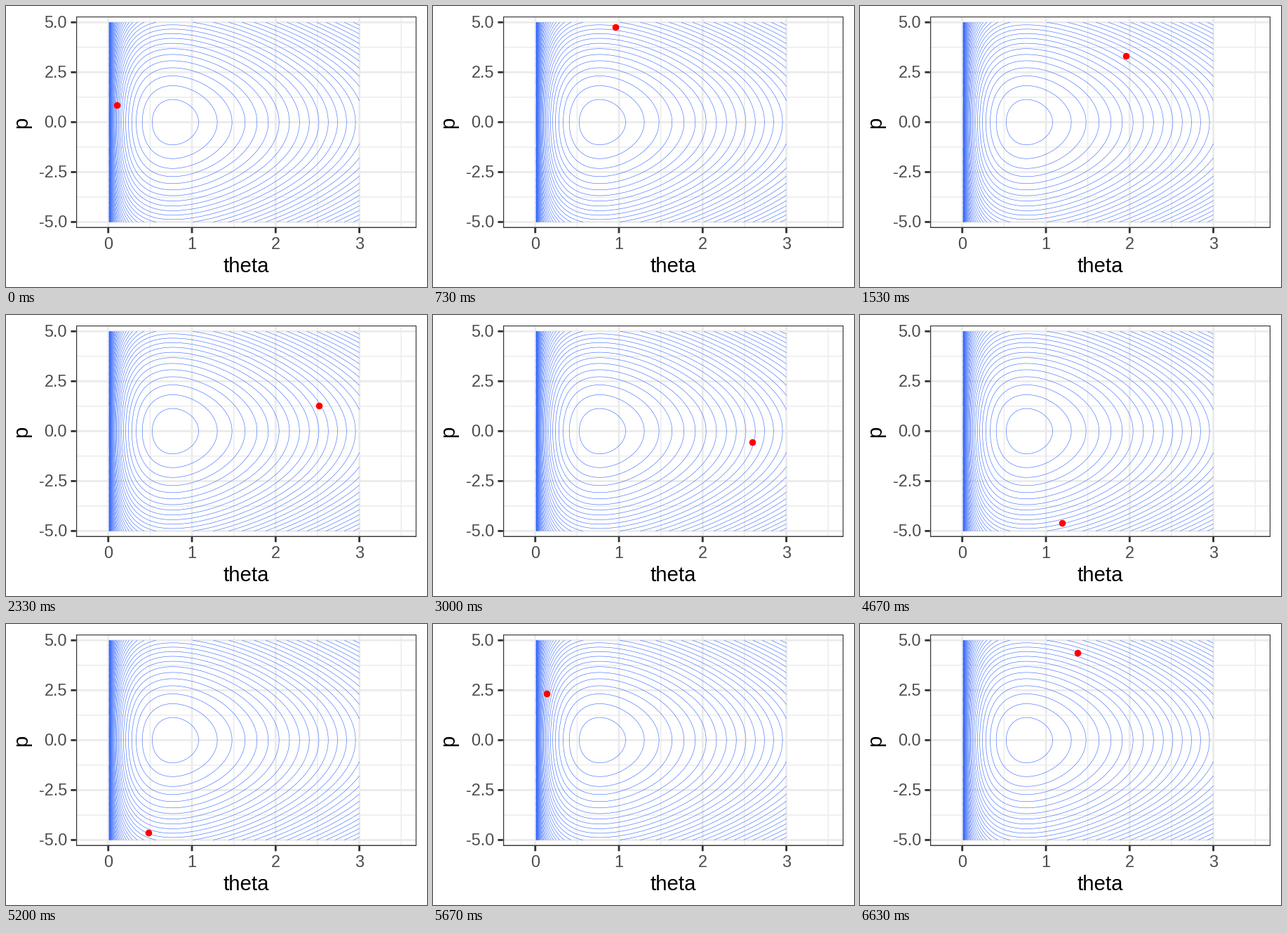
Animation, 600 px wide and 400 px high, one loop 6.67 s. Source, as a matplotlib script:

```python
import numpy as np
import matplotlib.pyplot as plt
from matplotlib.animation import FuncAnimation
from matplotlib.patches import Rectangle

W, H, DPI = 600, 400, 100
PX = 72 / DPI                  # one pixel in points
FRAMES, LOOP = 200, 6670
RATE, SHAPE, STEP = 13, 10, 0.01
LEFT, RIGHT, TOP, BOTTOM = 99.8, 585.3, 14.7, 316.0
X_LIM, P_LIM = (-0.385, 3.685), (-5.3, 5.3)
LINE = 2.845

plt.rcParams.update({"font.family": "Liberation Sans", "path.snap": False,
                     "axes.unicode_minus": False})


def potential(q):
    return RATE * q - SHAPE * np.log(q)


def force(q):
    return SHAPE / q - RATE


def leapfrog(q, p, n):
    path = []
    for _ in range(n):
        p += STEP / 2 * force(q)
        q += STEP * p
        p += STEP / 2 * force(q)
        path.append((q, p))
    return path


def to_px(q, p):
    x = LEFT + (q - X_LIM[0]) / (X_LIM[1] - X_LIM[0]) * (RIGHT - LEFT)
    y = BOTTOM - (p - P_LIM[0]) / (P_LIM[1] - P_LIM[0]) * (BOTTOM - TOP)
    return x, y


fig = plt.figure(figsize=(W / DPI, H / DPI), dpi=DPI, facecolor="white")

# Pixel canvas for ticks and labels
page = fig.add_axes([0, 0, 1, 1])
page.set(xlim=(0, W), ylim=(H, 0))
page.axis("off")

ax = fig.add_axes([LEFT / W, 1 - BOTTOM / H, (RIGHT - LEFT) / W, (BOTTOM - TOP) / H])
ax.set(xlim=X_LIM, ylim=P_LIM)
ax.axis("off")


def grid(xs, ps, width):
    style = dict(color="#EBEBEB", lw=width * PX, zorder=1)
    for x in xs:
        ax.axvline(x, **style)
    for p in ps:
        ax.axhline(p, **style)


def tick(xs, ys):
    page.plot(xs, ys, color="#333333", lw=LINE * PX, solid_capstyle="butt")


def label(x, y, text, size, color, **kw):
    page.text(x, y, text, fontsize=size * PX, color=color, **kw)


grid(np.arange(0.5, 4), (-3.75, -1.25, 1.25, 3.75), LINE / 2)
grid(range(4), np.arange(-5, 5.1, 2.5), LINE)

q, p = np.meshgrid(np.linspace(0.01, 3, 300), np.linspace(-5, 5, 101))
base = potential(SHAPE / RATE)
levels = base + 0.645 + 1.0215 * np.arange(46)
ax.contour(q, p, potential(q) + p ** 2 / 2, levels=levels,
           colors="#3366FF", linewidths=0.57 * PX, zorder=2)

ax.add_patch(Rectangle((0, 0), 1, 1, transform=ax.transAxes, fill=False,
                       ec="#333333", lw=LINE * PX, zorder=4))

for v in range(4):
    x, _ = to_px(v, 0)
    tick([x, x], [BOTTOM, BOTTOM + 7.33])
    label(x, 346, str(v), 23.47, "#4D4D4D", ha="center", va="baseline")
for v in np.arange(-5, 5.1, 2.5):
    _, y = to_px(0, v)
    tick([LEFT - 7.33, LEFT], [y, y])
    label(87, y + 8, f"{v:.1f}", 23.47, "#4D4D4D", ha="right", va="baseline")

label((LEFT + RIGHT) / 2, 379, "theta", 29.33, "black", ha="center", va="baseline")
label(30.5, (TOP + BOTTOM) / 2, "p", 29.33, "black", rotation=90,
      rotation_mode="anchor", ha="center", va="baseline")

path = leapfrog(0.1, 0.0, FRAMES)
dot, = ax.plot([], [], "o", color="red", ms=9.6 * PX, mew=0, zorder=3)


def update(i):
    x, y = path[i]
    dot.set_data([x], [y])
    return dot,


anim = FuncAnimation(fig, update, frames=FRAMES, interval=LOOP / FRAMES,
                     repeat=True, repeat_delay=0, blit=False)
plt.show()
```
